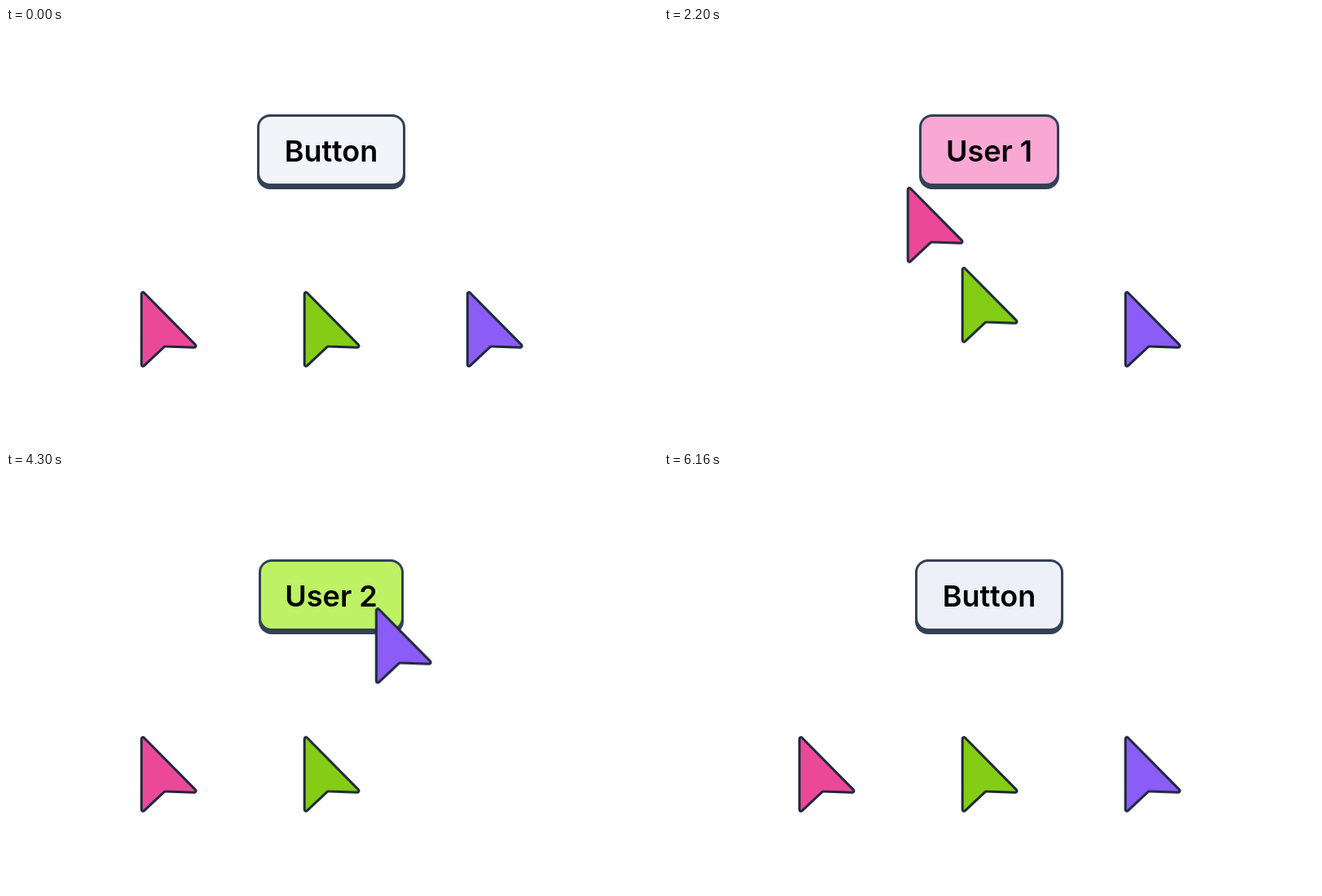
Write an HTML page that moves like this. It is 800x512 px and loops after 6260 ms.

```html
<!DOCTYPE html>
<html lang="en">
<head>
<meta charset="utf-8">
<title>Shared button</title>
<style>
  :root {
    --rest: #f1f5f9;
    --line: #334155;
    --pink: #ec4899;
    --lime: #84cc16;
    --violet: #8b5cf6;
  }

  html, body {
    margin: 0;
    width: 100%;
    height: 100%;
    overflow: hidden;
    background: #fff;
  }

  .stage {
    position: relative;
    width: 800px;
    height: 512px;
    overflow: hidden;
  }

  .button {
    position: absolute;
    left: 399px;
    top: 106px;
    width: 182px;
    height: 88px;
    box-sizing: border-box;
    transform: translateX(-50%);
    border: 3px solid var(--line);
    border-radius: 16px;
    background: var(--rest);
    color: #000;
    box-shadow: 0 4px var(--line);
    font: 600 36px/84px Inter, sans-serif;
    text-align: center;
    white-space: nowrap;
    animation: press 6260ms ease infinite, size 6260ms step-end infinite;
  }

  .button::before {
    content: "Button";
    animation: label 6260ms step-end infinite;
  }

  .cursors {
    position: absolute;
    inset: 0;
    stroke: #1e293b;
    stroke-width: 3;
    stroke-linejoin: round;
  }

  .cursor {
    transform: translate(var(--x), 0);
    animation: 6260ms ease-in-out infinite;
  }
  .one   { --x: 0px;   --to: 164px; fill: var(--pink);   animation-name: visit1; }
  .two   { --x: 200px; --to: 200px; fill: var(--lime);   animation-name: visit2; }
  .three { --x: 400px; --to: 288px; fill: var(--violet); animation-name: visit3; }

  /* Each cursor travels for 800 ms; the next one leaves as the last returns. */
  @keyframes visit1 {
    0%, 6.39%        { transform: translate(var(--x), 0); }
    19.169%, 31.31%  { transform: translate(var(--to), -158px); }
    44.089%, 100%    { transform: translate(var(--x), 0); }
  }
  @keyframes visit2 {
    0%, 31.31%       { transform: translate(var(--x), 0); }
    44.089%, 56.23%  { transform: translate(var(--to), -158px); }
    69.01%, 100%     { transform: translate(var(--x), 0); }
  }
  @keyframes visit3 {
    0%, 56.23%       { transform: translate(var(--x), 0); }
    69.01%, 85.942%  { transform: translate(var(--to), -158px); }
    98.722%, 100%    { transform: translate(var(--x), 0); }
  }

  /* Press and release take 150 ms each. */
  @keyframes press {
    0%, 22.204%      { background: var(--rest); color: #000; box-shadow: 0 4px var(--line); }
    24.601%, 26.837% { background: var(--pink); color: #fff; box-shadow: 0 4px transparent; }
    29.233%, 47.125% { background: #f9a8d4; color: #000; box-shadow: 0 4px var(--line); }
    49.521%, 51.757% { background: var(--lime); color: #fff; box-shadow: 0 4px transparent; }
    54.153%, 72.364% { background: #bef264; color: #000; box-shadow: 0 4px var(--line); }
    74.76%, 76.837%  { background: var(--violet); color: #fff; box-shadow: 0 4px transparent; }
    79.233%          { background: #c4b5fd; color: #000; box-shadow: 0 4px var(--line); }
    85.942%          { background: #c4b5fd; color: #000; box-shadow: 0 4px var(--line); animation-timing-function: ease-in-out; }
    98.722%, 100%    { background: #edf0f9; color: #000; box-shadow: 0 4px var(--line); }
  }

  @keyframes label {
    0%      { content: "Button"; }
    26.83%  { content: "User 1"; }
    51.75%  { content: "User 2"; }
    76.83%  { content: "User 3"; }
    86.1%, 100% { content: "Button"; }
  }

  @keyframes size {
    0%      { width: 182px; }
    26.83%  { width: 172px; }
    51.75%  { width: 178px; }
    76.83%  { width: 180px; }
    86.1%, 100% { width: 182px; }
  }
</style>
</head>
<body>
  <div class="stage">
    <div class="button"></div>
    <svg class="cursors" width="800" height="512" viewBox="0 0 800 512">
      <defs>
        <path id="arrow" d="M166.2 326.5C166.2 324.7 168.2 323.9 169.5 325.2L232.4 388.9C233.7 390.3 232.7 392.4 230.9 392.3L196 390.9Q194.9 390.8 194 391.6L169.5 414.7C168.2 415.9 166.2 415 166.2 413.3Z"/>
      </defs>
      <use class="cursor one" href="#arrow"/>
      <use class="cursor two" href="#arrow"/>
      <use class="cursor three" href="#arrow"/>
    </svg>
  </div>
</body>
</html>
```
